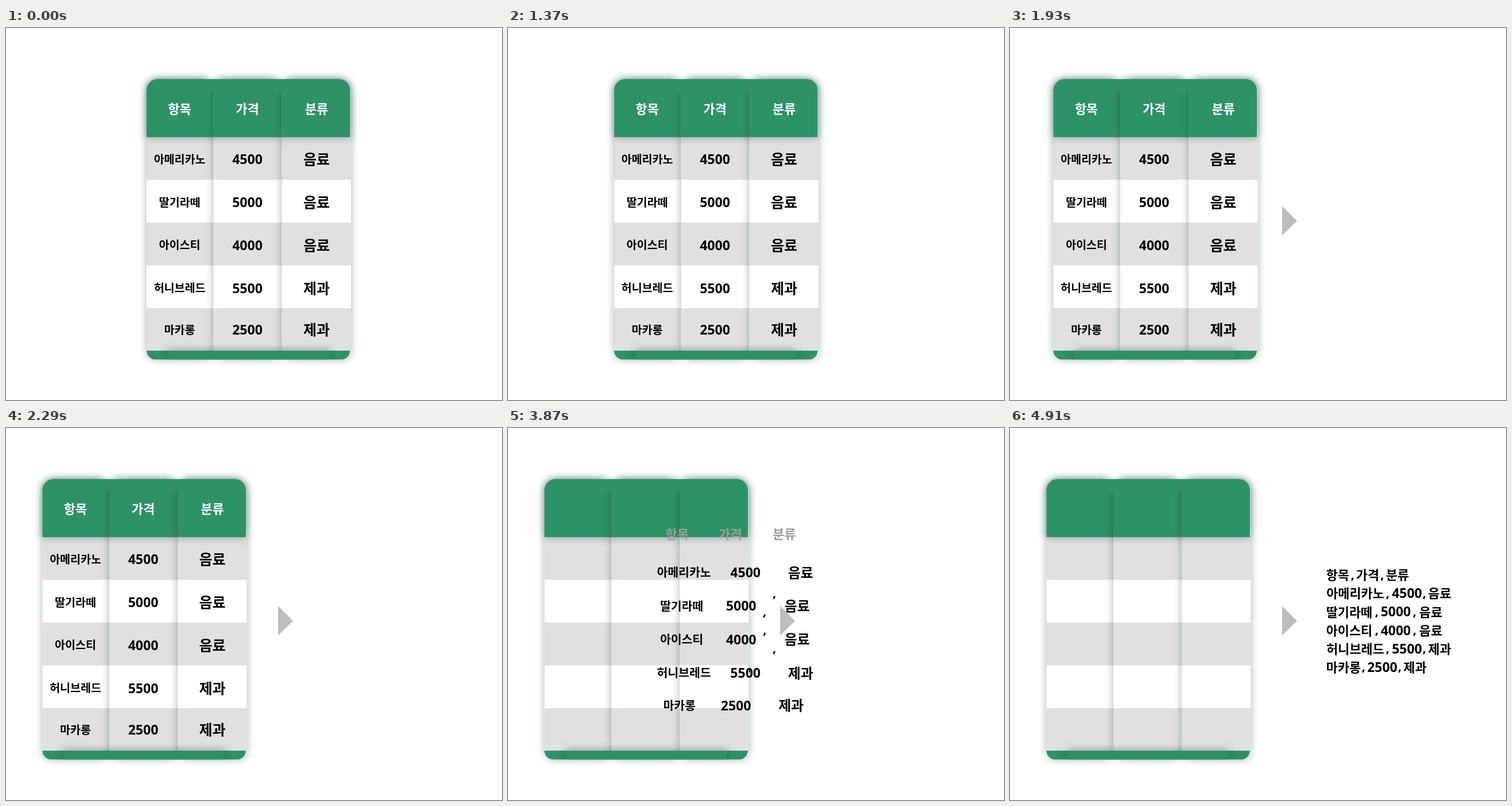
Write an HTML page with a canvas that moves like this. It is 864x648 px and loops after 8.23 s.

```html
<!DOCTYPE html>
<html lang="ko">
<head>
<meta charset="utf-8">
<style>
  html, body { margin: 0; height: 100%; overflow: hidden; background: #fff; }
  canvas { display: block; }
</style>
</head>
<body>
<canvas id="stage" width="864" height="648"></canvas>
<script>
const ctx = document.getElementById('stage').getContext('2d');
const LOOP = 8230, STEP = 40, SHIFT = -181.5;
const GREEN = '#2e9268', GRAY = '#e0e0e0';
const HANGUL = '"Noto Sans CJK KR", "Noto Sans KR", sans-serif';
const DIGITS = '"Noto Sans", sans-serif';

const rows = [
  ['항목', '가격', '분류'],
  ['아메리카노', '4500', '음료'],
  ['딸기라떼', '5000', '음료'],
  ['아이스티', '4000', '음료'],
  ['허니브레드', '5500', '제과'],
  ['마카롱', '2500', '제과'],
];
const cellX = [302.5, 420.5, 541];
const cellY = [140.5, 228.5, 303.5, 378, 453, 525.5];
const columns = [[245, 116.5], [361.5, 119], [480.5, 120.5]];

// Centres in the CSV list, keyed by the length of the first word
const listX = {
  2: [571, 623, 675], 3: [581, 648.5, 705.5],
  4: [591, 672, 733], 5: [601.5, 691.5, 748.5],
};
const commaX = { 2: [597, 648.5], 3: [616, 679], 4: [639, 705], 5: [658, 722] };
const listY = i => 256 + 32.1 * i;

const clamp = v => Math.min(1, Math.max(0, v));
const lerp = (a, b, p) => a + (b - a) * p;
const bezier = (a, b, s) => 3 * s * (1 - s) ** 2 * a + 3 * s * s * (1 - s) * b + s ** 3;

function ease(u) {
  if (u <= 0 || u >= 1) return clamp(u);
  let lo = 0, hi = 1;
  for (let i = 0; i < 24; i++) {
    const mid = (lo + hi) / 2;
    if (bezier(0.3, 0.3, mid) < u) lo = mid; else hi = mid;
  }
  return bezier(0.06, 1, lo);
}

function box(x, y, w, h, radii, color, shadow, blur = 14) {
  ctx.save();
  if (shadow) { ctx.shadowColor = shadow; ctx.shadowBlur = blur; }
  ctx.fillStyle = color;
  ctx.beginPath();
  ctx.roundRect(x, y, w, h, radii);
  ctx.fill();
  ctx.restore();
}

function drawTable(dx) {
  ctx.save();
  ctx.translate(dx, 0);
  for (const [x, w] of columns) {
    box(x, 90, w, 487.5, [20, 20, 16, 16], '#fff', 'rgba(30,80,60,.42)');
    for (const y of [190, 339, 488]) box(x, y, w, 74.5, 0, GRAY);
  }
  for (const [x, w] of columns) {
    box(x, 89, Math.min(w, 599.5 - x), 101, [20, 20, 0, 0], GREEN, 'rgba(20,70,50,.5)');
  }
  box(245, 89, 354.5, 20, [20, 20, 0, 0], GREEN);

  box(245, 562, 354.5, 15.5, [0, 0, 16, 16], GREEN);
  ctx.beginPath();
  ctx.roundRect(245, 540, 354.5, 37.5, [0, 0, 16, 16]);
  ctx.clip();
  box(281, 562, 282, 15.5, 0, GREEN, 'rgba(50,55,80,.5)');
  ctx.restore();
}

function drawArrow(alpha) {
  ctx.globalAlpha = alpha;
  ctx.fillStyle = '#bdbdbd';
  ctx.beginPath();
  ctx.moveTo(474, 310);
  ctx.lineTo(500, 336);
  ctx.lineTo(474, 361.5);
  ctx.fill();
  ctx.globalAlpha = 1;
}

function drawCommas(p) {
  ctx.fillStyle = '#000';
  ctx.font = `600 22px ${DIGITS}`;
  rows.forEach(([word], i) => {
    for (const x of commaX[word.length]) ctx.fillText(',', x - 420 * (1 - p), listY(i) + 6.5);
  });
}

function drawWords(dx, p) {
  rows.forEach((row, i) => row.forEach((word, c) => {
    const numeric = i > 0 && c === 1;
    const startSize = i ? [19.5, 23, 25][c] : 22;
    const size = lerp(startSize, numeric ? 23 : 21.9, p);
    const x = lerp(cellX[c] + dx, listX[row[0].length][c], p);
    const y = lerp(cellY[i] + (numeric ? 0.5 : 0), listY(i), p);
    const shade = i ? 0 : Math.round(255 * (1 - p));
    ctx.fillStyle = `rgb(${shade},${shade},${shade})`;
    ctx.font = numeric ? `600 ${size}px ${DIGITS}` : `700 ${size}px ${HANGUL}`;
    ctx.fillText(word, x, y + size * (numeric ? 0.357 : 0.38));
  }));
}

function draw(now) {
  const t = Math.floor((now % LOOP - 10) / STEP) * STEP + 10;
  const slide = (t - 1050) / 1240;
  const dx = SHIFT * ease(slide);
  const p = ease((t - 3430) / 1480);

  ctx.fillStyle = '#fff';
  ctx.fillRect(0, 0, 864, 648);
  ctx.textAlign = 'center';
  drawArrow(clamp((slide - 0.42) / 0.26));
  if (p > 0) drawCommas(p);
  drawTable(dx);
  drawWords(dx, p);
}

const start = performance.now();
function tick() {
  draw(performance.now() - start);
  requestAnimationFrame(tick);
}
tick();
</script>
</body>
</html>
```
